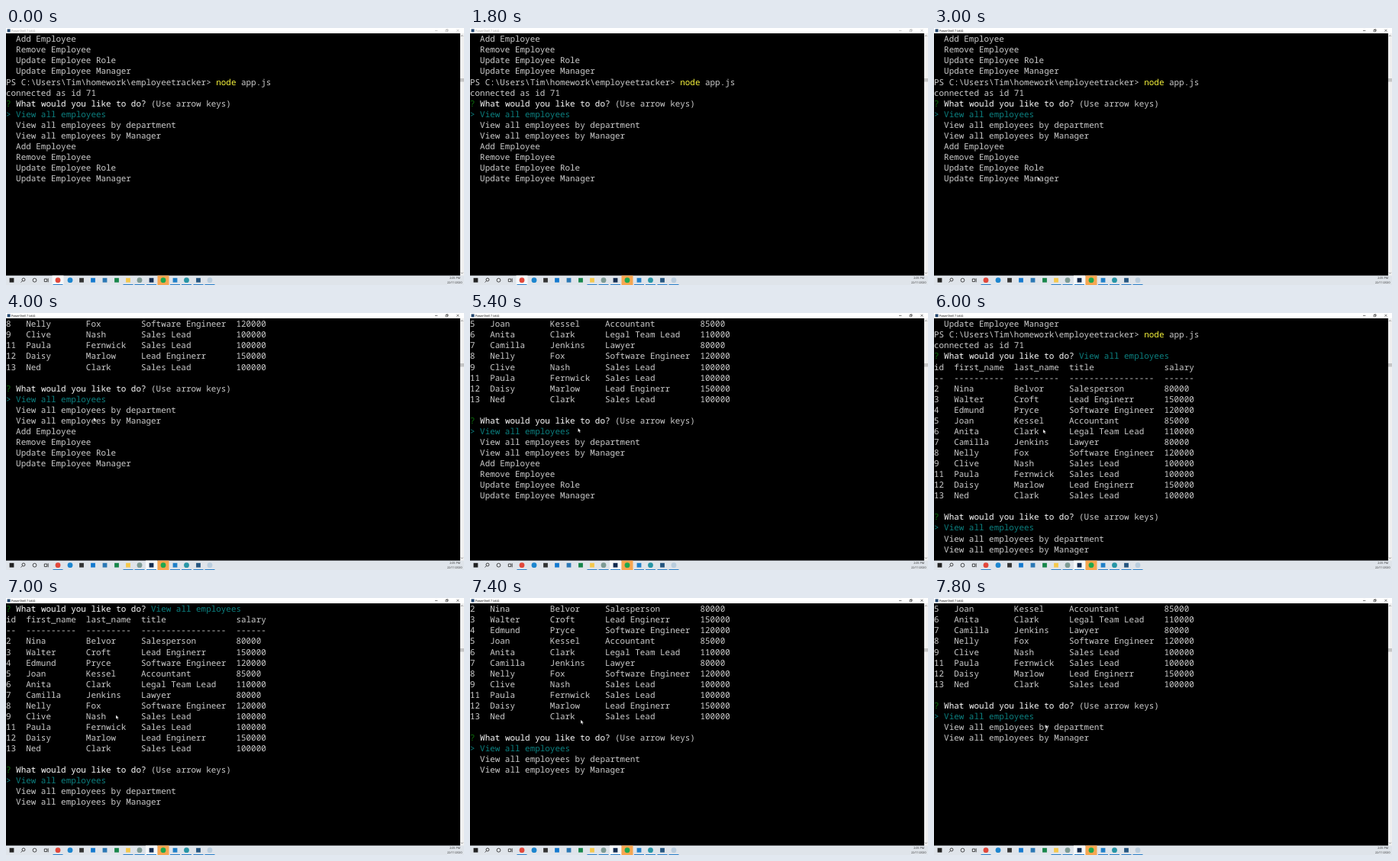
Write an HTML page that moves like this. It is 600 px wide and 337 px high and loops after 8 s.

```html
<!DOCTYPE html>
<html lang="en">
<head>
<meta charset="utf-8">
<title>Employee tracker</title>
<style>
html, body { margin: 0; width: 100%; height: 100%; overflow: hidden; background: #000; }
#stage { position: relative; width: 600px; height: 337px; overflow: hidden; background: #000; }
#term { position: absolute; left: 0; top: 8.25px; width: 594px; height: 310px; overflow: hidden; }
pre {
  margin: 0; color: #ccc; white-space: pre; text-rendering: geometricPrecision;
  font: 10.9375px/14.0625px "Noto Sans Mono", monospace;
}
.w { color: #fff; }
.g { color: #0a720a; }
.t { color: #0c8080; }
.y { color: #f8f53c; }
svg { position: absolute; left: 0; top: 0; }
svg text { font: 3.7px "Open Sans", sans-serif; text-rendering: geometricPrecision; }
</style>
</head>
<body>
<div id="stage">
  <div id="term"><pre id="text"></pre></div>
  <svg width="600" height="337" viewBox="0 0 600 337">
    <rect width="600" height="7" fill="#fff"/>
    <rect x="1.6" y="1.4" width="4" height="4" fill="#24476f"/>
    <g id="bar">
      <text x="7" y="4.8" fill="currentColor">PowerShell 7 (x64)</text>
      <path d="M562 3.5h3.4M576 2.6h2.3v2.3h-2.3zM576.8 2.6v-.8h2.3v2.3h-.8M590.4 1.8l3 3m0-3l-3 3"
        fill="none" stroke="currentColor" stroke-width=".5"/>
    </g>
    <rect x="595" y="7" width="5" height="318" fill="#f0f0f0"/>
    <rect x="595" y="66" width="5" height="4.5" fill="#c6c6c6"/>
    <path d="M596 11l1.4-1.4 1.4 1.4M596 320.6l1.4 1.4 1.4-1.4" fill="none" stroke="#555" stroke-width=".6"/>
    <rect y="324.6" width="600" height="13" fill="#dfe4ea"/>
    <rect id="focus" y="324.6" width="15" height="13" fill="#f6f8fa"/>
    <rect x="198.5" y="324.6" width="15" height="13" fill="#f7a650"/>
    <g fill="none" stroke="#222" stroke-width=".8">
      <circle cx="23" cy="330" r="2"/><path d="M21.6 331.5l-2 2"/>
      <circle cx="37.5" cy="330.7" r="2.4"/>
      <path d="M50.3 329h3.4v3.6h-3.4zM55.2 328.3v5"/>
    </g>
    <g id="icons"></g>
    <g fill="#222" text-anchor="end">
      <text x="595" y="329.4">2:05 PM</text>
      <text x="597.5" y="335.2">22/11/2020</text>
    </g>
    <path id="mouse" d="M0 0v5l1.2-1 .9 1.9.9-.4-.9-1.8h1.6z" fill="#fff" stroke="#222" stroke-width=".3"/>
  </svg>
</div>
<script>
const $ = id => document.getElementById(id);
const tag = (c, s) => `<span class="${c}">${s}</span>`;

const row = cells => cells.map((s, i) => s.padEnd([4, 12, 11, 19, 6][i])).join('');
const table = `id,first_name,last_name,title,salary
--,----------,---------,-----------------,------
2,Nina,Belvor,Salesperson,80000
3,Walter,Croft,Lead Enginerr,150000
4,Edmund,Pryce,Software Engineer,120000
5,Joan,Kessel,Accountant,85000
6,Anita,Clark,Legal Team Lead,110000
7,Camilla,Jenkins,Lawyer,80000
8,Nelly,Fox,Software Engineer,120000
9,Clive,Nash,Sales Lead,100000
11,Paula,Fernwick,Sales Lead,100000
12,Daisy,Marlow,Lead Enginerr,150000
13,Ned,Clark,Sales Lead,100000`.split('\n').map(s => row(s.split(',')));

const edits = ['Add Employee', 'Remove Employee', 'Update Employee Role', 'Update Employee Manager'].map(s => '  ' + s);
const ask = tag('g', '?') + tag('w', ' What would you like to do? ');
const menu = [
  ask + '(Use arrow keys)',
  tag('t', '&gt; View all employees'),
  '  View all employees by department',
  '  View all employees by Manager',
  ...edits
];
const start = [
  ...edits,
  `PS C:\\Users\\Tim\\homework\\employeetracker&gt; ${tag('y', 'node')} app.js`,
  'connected as id 71'
];
const before = [...start, ...menu];
const after = [...start, ask + tag('t', 'View all employees'), ...table, '', ...menu];

// taskbar: x, colour, round, running
const icons = [
  [7.5, '#222', 0, 0], [68, '#e2483b', 1, 1], [84, '#1d86cf', 1, 0], [99, '#333', 0, 0],
  [114, '#1479cf', 0, 0], [129.5, '#2b78b5', 0, 0], [145, '#17864a', 0, 0], [160, '#f5c84c', 0, 1],
  [175, '#7d9a94', 1, 1], [190.5, '#142c4f', 0, 1], [206, '#1fa84f', 1, 0], [221.5, '#1f7fc8', 0, 1],
  [236.5, '#2795a5', 1, 1], [252, '#25557f', 0, 1], [267, '#b9cddd', 1, 1]
];
$('icons').innerHTML = icons.map(([x, c, round, on]) =>
  (round ? `<circle cx="${x}" cy="330.7" r="3.4" fill="${c}"/>`
    : `<rect x="${x - 2.9}" y="327.8" width="5.8" height="5.8" fill="${c}"/>`) +
  (on ? `<rect x="${x - 6.5}" y="336" width="13" height="1" fill="#2a7fc9"/>` : '')).join('');

// time, first visible line
const scrolls = [[0, 0], [3600, 15], [5400, 12], [5600, 9], [5800, 6], [6000, 3], [7000, 6], [7400, 9], [7600, 12]];
// time, x, y
const path = [[2200, 190, 330], [2400, 189, 329], [3200, 118, 150], [4000, 115, 137],
  [5400, 141.5, 151], [6000, 143, 152.5], [7000, 144, 153.5], [7800, 146.2, 166]];

function mouseAt(t) {
  const i = Math.max(1, path.findIndex(p => p[0] >= t));
  const [a, b] = [path[i - 1], path[i]];
  const k = (t - a[0]) / (b[0] - a[0]);
  return [1, 2].map(j => a[j] + (b[j] - a[j]) * k);
}

let shown = -1;
function draw(now) {
  const t = Math.floor(now % 8000 / 200) * 200;
  if (t !== shown) {
    shown = t;
    const top = scrolls.filter(s => s[0] <= t).pop()[1];
    // lines pushed below the window are not repainted once scrolled back
    const lines = t < 3600 ? before : t < 6000 ? after : after.slice(0, 25);
    $('text').innerHTML = lines.slice(top, top + 22).join('\n');
    const active = t >= 2400;
    $('bar').setAttribute('color', active ? '#000' : '#999');
    $('focus').setAttribute('x', active ? 183 : 60.5);
    const seen = t >= 2200;
    $('mouse').setAttribute('visibility', seen ? 'visible' : 'hidden');
    if (seen) $('mouse').setAttribute('transform', `translate(${mouseAt(t)})`);
  }
  requestAnimationFrame(draw);
}
draw(0);
</script>
</body>
</html>
```
